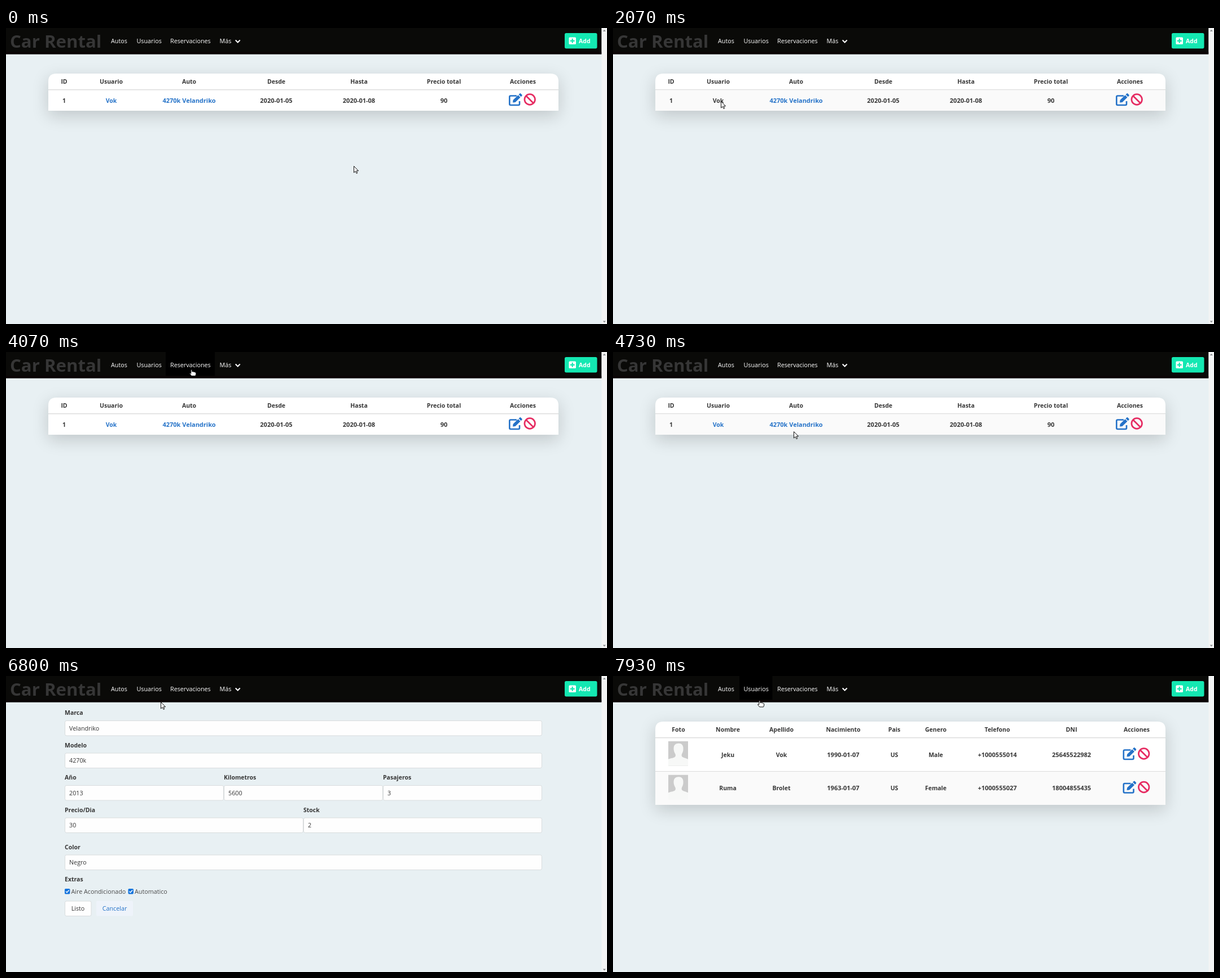
These frames come from a looping animation (1065x526 px, 8 s). An HTML page:

```html
<!DOCTYPE html>
<html lang="es">
<head>
<meta charset="utf-8">
<title>Car Rental</title>
<style>
html, body { margin: 0; width: 100%; height: 100%; overflow: hidden; background: #e8f0f3; }
svg { display: block; width: 100vw; height: 100vh; }
text { font: 10.75px "Open Sans", "Noto Sans", sans-serif; fill: #363636; white-space: pre; }
.b { font-weight: 700; font-size: 10.5px; }
.num { font-size: 11px; }
.mid { text-anchor: middle; }
.nav { fill: #fff; }
.link { fill: #2472c8; }
.link.over { fill: #363636; }
.brand { font-size: 31.2px; font-weight: 700; }
.soft { fill: #4a4a4a; }
.status { fill: #8b9194; }
</style>
</head>
<body>
<svg id="stage" viewBox="0 0 1065 526" preserveAspectRatio="none"></svg>
<script>
const LOOP = 8000, TICK = 200 / 3;
const person = { first: 'Jeku', last: 'Vok', phone: '+1000555014', dni: '25645522982' };
const car = { brand: 'Velandriko', model: '4270k' };

const rect = (x, y, w, h, fill, extra = '') =>
  `<rect x="${x}" y="${y}" width="${w}" height="${h}" fill="${fill}" ${extra}/>`;
const text = (x, y, s, cls = '') => `<text x="${x}" y="${y}" class="${cls}">${s}</text>`;
const line = (d, color, width, extra = '') =>
  `<path d="${d}" fill="none" stroke="${color}" stroke-width="${width}" ${extra}/>`;
const group = (x, y, body, scale = 1) =>
  `<g transform="translate(${x} ${y}) scale(${scale})">${body}</g>`;
const label = (x, y, s) => text(x, y, s, 'b');
const box = (x, y, w, fill = '#fefefe', stroke = '#d8dcdd') =>
  rect(x + .5, y + .5, w - 1, 26.5, fill, `rx="2.7" stroke="${stroke}"`);
const field = (x, y, w, s) => box(x, y, w) + text(x + 8, y + 17.5, s);
const chevron = (x, y, color) => line(`M${x} ${y}l4 4l4-4`, color, 2);
const cell = (x, y, s, cls = '') =>
  text(x, y, s, `b mid ${/\d{2}/.test(s) ? 'num' : ''} ${cls}`);

function portrait(x, y, scale, radius) {
  const id = 'clip' + x + y;
  return group(x, y, `<clipPath id="${id}">${rect(0, 0, 140, 175, '#000', `rx="${radius}"`)}</clipPath>
    <g clip-path="url(#${id})">${rect(0, 0, 140, 175, '#cbcbcb')}
    <path fill="#f7f8f7" d="M0 127C20 120 46 118 50 107C54 98 50 91 46 84C38 70 36 50 40 36
      C46 19 60 15 76 15C98 15 107 34 106 52C106 68 104 75 97 88C93 98 93 108 101 112
      C115 119 130 122 140 127V175H0Z"/></g>`, scale);
}

const actions = (x, y) => group(x, y,
  line('M14 4.5H3.3Q1.3 4.5 1.3 6.5V19Q1.3 21 3.3 21H17Q19 21 19 19V14', '#2472c8', 2.6) +
  `<path fill="#2472c8" d="M7 16.5L7.6 12L16.5 3.2L20.5 7.2L11.5 16ZM17.5 2.2L19.3 .5Q20.3-.3 21.3 .6L23.4 2.7Q24.2 3.7 23.4 4.6L21.6 6.3Z"/>` +
  line('M30.3 4.3L44 18', '#e62c62', 2.7) +
  '<circle cx="37.2" cy="11" r="9.3" fill="none" stroke="#e62c62" stroke-width="2.7"/>');

function card(height, columns) {
  const top = `M75 ${81 + height}V95Q75 81 89 81H965Q979 81 979 95V${81 + height}Z`;
  return rect(75, 90, 904, height, '#000', 'opacity=".17" style="filter:blur(15px)"') +
    `<path d="${top}" fill="#fff"/>` +
    columns.map(([x, s]) => cell(x, 99, s)).join('') +
    rect(75, 109, 904, 1.4, '#dbdbdb');
}

const rentPage = () => card(66, [[103, 'ID'], [186.5, 'Usuario'], [324.5, 'Auto'], [479, 'Desde'],
    [625.5, 'Hasta'], [776, 'Precio total'], [916, 'Acciones']]) +
  rect(75, 110.4, 904, 36.6, '#fafafa', 'id="row"') +
  cell(103, 132.5, '1') +
  `<g>${cell(186.5, 132.5, person.last, 'link user')}</g>` +
  cell(324.5, 132.5, `${car.model} ${car.brand}`, 'link auto') +
  cell(479, 132.5, '2020-01-05') + cell(625.5, 132.5, '2020-01-08') +
  cell(776, 132.5, '90') + actions(891, 116);

function usersPage() {
  const columns = [[116, 'Foto'], [203.5, 'Nombre'], [298.5, 'Apellido'], [408, 'Nacimiento'],
    [498.5, 'Pais'], [572, 'Genero'], [681, 'Telefono'], [812.5, 'DNI'], [928, 'Acciones']];
  const rows = [
    [person.first, person.last, '1990-01-07', 'US', 'Male', person.phone, person.dni],
    ['Ruma', 'Brolet', '1963-01-07', 'US', 'Female', '+1000555027', '18004855435']];
  return card(148, columns) + rect(75, 169, 904, 60, '#fafafa') + rect(75, 169, 904, 1, '#dbdbdb') +
    rows.map((row, i) => {
      const y = i * 59.5;
      return portrait(98, 116 + y, .25, 0) + actions(903.5, 127 + y) +
        row.map((s, j) => cell(columns[j + 1][0], 143.5 + y, s)).join('');
    }).join('');
}

const buttons = y => box(104, y, 47.5) + text(127.5, y + 17.5, 'Listo', 'mid') +
  rect(160, y, 65, 27, '#eef3fa', 'rx="2.7"') + text(192.5, y + 17.5, 'Cancelar', 'mid link');

const userPage = () => label(104, 69, 'Foto') + portrait(104, 79, 1, 16) +
  box(104, 258.5, 40, '#f3f4f4') +
  '<path fill="#363636" d="M121 266.5l4.8 5h-3v3.3h-3.6v-3.3h-3zM115.5 273.5h2.5v2.2h6v-2.2h2.5v4h-11z"/>' +
  label(251, 69, 'Nombre') + field(251, 79, 349, person.first) +
  label(600, 69, 'Apellido') + field(600, 79, 349.5, person.last) +
  label(251, 135, 'Fecha de Nacimiento') + field(251, 144.5, 558.5, '01/07/1990') +
  line('M788.7 155h9v8.3h-9z', '#111', 1.3) + rect(788, 154, 10.4, 3, '#111') +
  rect(789.7, 152.5, 1.5, 2, '#111') + rect(795.2, 152.5, 1.5, 2, '#111') +
  label(251, 192, 'Pais') + field(251, 202, 699, 'US') +
  label(251, 250, 'Genero') + field(251, 259.5, 77, 'Hombre') + chevron(308, 271.5, '#2472c8') +
  label(546, 250, 'Telefono') + field(545.5, 259.5, 404.5, person.phone) +
  label(104, 307, 'DNI') + field(104, 317, 846, person.dni) + buttons(352.5);

const check = (x, s) => rect(x, 378, 9.4, 9.4, '#1373dc', 'rx="1.6"') +
  line(`M${x + 2} 382.7l2 2l3.6-4.2`, '#fff', 1.4) + text(x + 11.5, 387, s, 'soft');

const carPage = () => [
  [104, 79, 846, 'Marca', car.brand], [104, 136.5, 846, 'Modelo', car.model],
  [104, 194, 282, 'Año', '2013'], [386, 194, 282, 'Kilometros', '5600'],
  [668, 194, 282, 'Pasajeros', '3'], [104, 251.5, 423, 'Precio/Dia', '30'],
  [527, 251.5, 423, 'Stock', '2'], [104, 317.5, 846, 'Color', 'Negro']
].map(([x, y, w, name, value]) => label(x, y - 10, name) + field(x, y, w, value)).join('') +
  label(104, 365, 'Extras') + check(104, 'Aire Acondicionado') + check(216.5, 'Automatico') +
  buttons(399.5);

const navbar = rect(0, 0, 1055.5, 46.5, '#0a0a08') + rect(0, 42.5, 1055.5, 4, '#0b0304') +
  rect(224, 0, 58.5, 42.5, '#000', 'id="navUsers"') + rect(283, 0, 87, 42.5, '#000', 'id="navRent"') +
  text(7, 35, 'Car Rental', 'brand') +
  [[186, 'Autos'], [231.5, 'Usuarios'], [291, 'Reservaciones'], [378.5, 'Más']]
    .map(([x, s]) => text(x, 26.5, s, 'nav')).join('') +
  chevron(406.7, 21.5, '#fff') +
  rect(990, 9, 57.5, 27.5, '#14e8b2', 'rx="2.7"') + rect(997.5, 16.5, 12.5, 12.5, '#fff', 'rx="1.6"') +
  line('M1003.7 18.8v8M999.7 22.8h8', '#14e8b2', 2.2) + text(1015, 26.5, 'Add', 'b nav');

const scrollbar = rect(1055.5, 0, 9.5, 526, '#f3f4f4') +
  '<path id="arrows" fill="#85888a" d="M1057.7 6l2.6-3l2.6 3zM1057.7 520.5l2.6 3l2.6-3z"/>';

const pointer = `<g id="cursor">
  <path id="arrow" d="M.5 .5V12L3.2 9.5L5.1 13.5L6.8 12.7L5 8.8H8.6Z" fill="#fff" stroke="#111"/>
  <path id="hand" d="M-1.2 5.5V1Q-.2-.3 .8 1V4Q3 3.4 4 4.4Q5.6 4.2 6.2 5.2Q7.7 5 7.7 6.6V8.5
    L6.6 11.5H-.2L-3.4 7.6Q-3.4 6.2-2 6.8L-1.2 7.4Z" fill="#fff" stroke="#111"/></g>`;

const pages = { rent: rentPage, user: userPage, car: carPage, users: usersPage };
const $ = id => document.getElementById(id);
$('stage').innerHTML = rect(0, 0, 1065, 526, '#e8f0f3') +
  Object.entries(pages).map(([id, draw]) => `<g id="${id}">${draw()}</g>`).join('') +
  navbar + scrollbar +
  `<g id="status">${rect(-1, 508.5, 105, 19, '#eaeeef', 'id="statusBox" stroke="#d2d6d8" rx="2"')}
   ${text(4, 521, '', 'status')}</g>` + pointer;

// [time, x, y] of the pointer's hot spot
const path = [[0, 616, 245], [70, 616, 245], [870, 420, 138], [930, 410, 138], [1200, 325, 130],
  [1470, 235, 136], [1870, 235, 136], [2070, 191, 130], [2130, 188, 127], [2730, 188, 127],
  [3330, 329, 32], [3400, 329, 31], [4470, 329, 31], [4730, 320, 141], [4870, 320, 141],
  [5000, 322, 131], [5800, 322, 131], [5930, 318, 150], [6530, 318, 150], [6800, 274, 46],
  [7000, 260, 43.5], [LOOP, 260, 43.5]];
const visits = [[0, 'rent'], [2470, 'user'], [3670, 'rent'], [5470, 'car'], [7270, 'users']];
const hands = [[1070, 1330], [2130, 2800], [3270, 4530], [4930, 5800], [6870, LOOP]];
const host = 'localhost:3000/';
const hints = [[1070, 1400, 'car/add/1', 131], [2200, 2600, 'user/add/1', 137],
  [3270, 3800, 'rent', 104], [5000, 5600, 'car/add/1', 131], [6930, 7470, 'user', 104]];

const clamp = v => Math.max(0, Math.min(1, v));
const show = (id, on) => { $(id).style.display = on ? '' : 'none'; };

function pointerAt(t) {
  const i = Math.max(1, path.findIndex(p => p[0] >= t));
  const [t0, x0, y0] = path[i - 1], [t1, x1, y1] = path[i];
  const k = clamp((t - t0) / (t1 - t0)), e = k * k * (3 - 2 * k);
  return [x0 + (x1 - x0) * e, y0 + (y1 - y0) * e];
}

function render(t) {
  const [x, y] = pointerAt(t);
  const page = visits.filter(v => v[0] <= t).pop()[1];
  const inside = (l, r, top, bottom) => x >= l && x <= r && y >= top && y <= bottom;
  for (const id in pages) show(id, id === page);
  show('arrows', page !== 'users');
  show('row', inside(75, 979, 110, 147));
  show('navUsers', inside(224, 282, 0, 45));
  show('navRent', inside(283, 370, 0, 45));
  document.querySelector('.user').classList.toggle('over', inside(176, 197, 120, 136));
  document.querySelector('.auto').classList.toggle('over', inside(280, 369, 120, 136));

  const hand = hands.some(([from, to]) => t >= from && t < to);
  show('hand', hand);
  show('arrow', !hand);
  $('cursor').setAttribute('transform', `translate(${x} ${y})`);

  const hint = hints.find(([from, to]) => t >= from && t < to);
  show('status', !!hint);
  if (hint) {
    const [from, to, route, width] = hint;
    $('status').style.opacity = Math.min(clamp((t - from + 70) / 140), clamp((to - t) / 130));
    $('status').querySelector('text').textContent = host + route;
    $('statusBox').setAttribute('width', width);
  }
}

const start = performance.now();
function frame() {
  const t = (performance.now() - start) % LOOP;
  const step = Math.floor((t + 4) / TICK);
  render(Math.min(LOOP - 1, Math.round(step * TICK / 10) * 10));
  requestAnimationFrame(frame);
}
frame();
</script>
</body>
</html>
```
